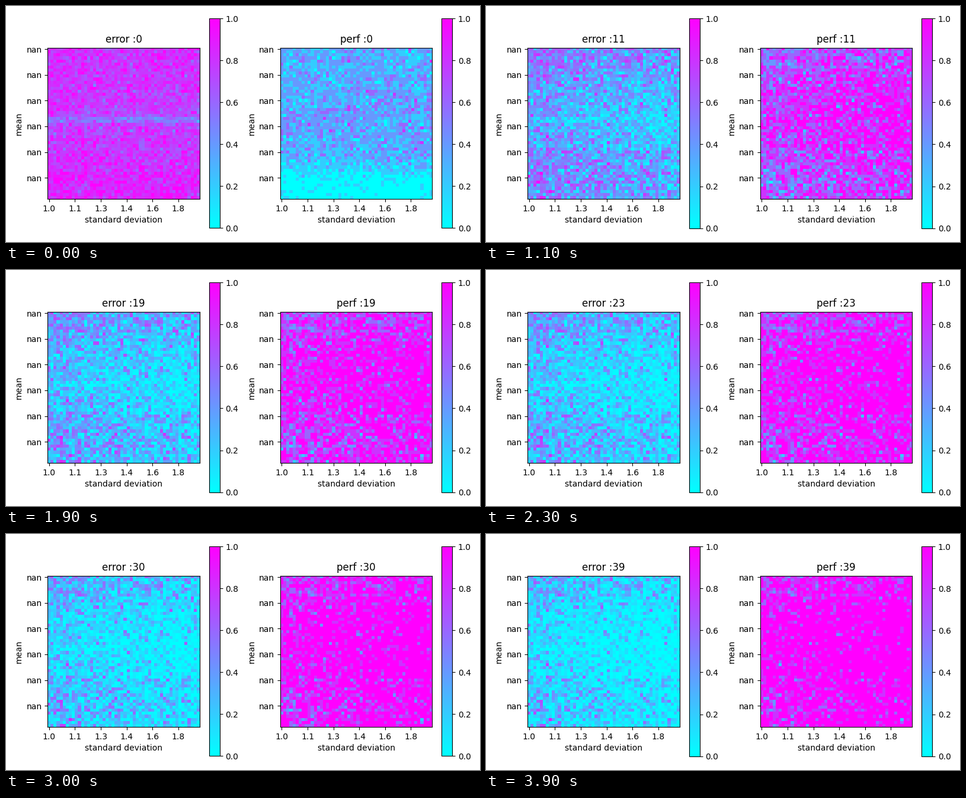
Animation of 800x400 px, one loop 4 s. Source, as a matplotlib script:

```python
import numpy as np
import matplotlib.pyplot as plt
from matplotlib.animation import FuncAnimation

W, H = 800, 400
FRAMES, INTERVAL = 40, 100
N = 50
SIDE = 256.5

plt.rcParams["font.family"] = "DejaVu Sans"
fig = plt.figure(figsize=(W / 100, H / 100), dpi=100, facecolor="white")


def box(left, top, right, bottom):
    """Pixel edges, measured from the top left, as figure fractions."""
    return [left / W, 1 - bottom / H, (right - left) / W, (bottom - top) / H]


def bar_box(left, step):
    # the bar's lower edge moves by a fraction of a pixel on every other step
    x = left + SIDE * 0.85 / 0.8
    return box(x, 21.2, x + 17.77, 376.4 if step % 2 == 0 else 376.6)


# Fixed properties of every cell
rng = np.random.default_rng(7)
row, col = np.mgrid[0:N, 0:N]
start_noise, speed_noise, perf_noise = rng.normal(size=(3, N, N))
mid = np.exp(-((row - 23) / 9) ** 2)
groove = np.exp(-((row - 23.5) / 1.1) ** 2) * (0.16 + 0.14 * col / N)
start = 0.81 - 0.07 * mid + 0.05 * (row > 40) + 0.09 * start_noise
speed = 0.11 * np.exp(0.75 * speed_noise + 0.75 * (col / N - 0.5))
speed *= 0.9 + 0.4 * mid - 0.35 * np.exp(-(row / 6) ** 2)
late_rows = 0.28 * np.clip((row - 36) / 8, 0, 1)


def fields(step):
    jitter = np.random.default_rng(100 + step).normal(size=(2, N, N))
    decay = np.exp(-speed * step ** 0.8)
    wobble = 0.06 * decay * jitter[0]
    error = (start - groove) * decay + wobble
    perf = 1.2 - 1.1 * start * decay + 0.11 * perf_noise + 0.03 * jitter[1]
    perf -= late_rows * np.exp(-step / 4)
    return np.clip(error, 0, 1), np.clip(np.round(perf * 5) / 5, 0, 1)


class Panel:
    def __init__(self, name, left):
        self.name, self.left = name, left
        self.ax = fig.add_axes(box(left, 70.6, left + SIDE, 70.6 + SIDE))
        self.im = self.ax.imshow(np.zeros((N, N)), cmap="cool", vmin=0, vmax=1,
                                 aspect="auto", interpolation="nearest")
        ticks = np.arange(0, N, 8.5)
        self.ax.set_xticks(ticks, ["1.0", "1.1", "1.3", "1.4", "1.6", "1.8"])
        self.ax.set_yticks(ticks, ["nan"] * len(ticks))
        self.ax.set_xlabel("standard deviation")
        self.ax.set_ylabel("mean")
        self.title = self.ax.set_title("")
        self.cax = fig.add_axes(bar_box(left, 0))
        fig.colorbar(self.im, cax=self.cax, ticks=np.linspace(0, 1, 6))

    def show(self, data, step):
        self.im.set_data(data)
        self.title.set_text(f"{self.name} :{step}")
        self.cax.set_position(bar_box(self.left, step))


panels = [Panel("error", 70.3), Panel("perf", 462.9)]


def update(step):
    for panel, data in zip(panels, fields(step)):
        panel.show(data, step)
    return []


anim = FuncAnimation(fig, update, frames=FRAMES, interval=INTERVAL,
                     init_func=lambda: update(0), repeat=True, repeat_delay=0)
plt.show()
```
